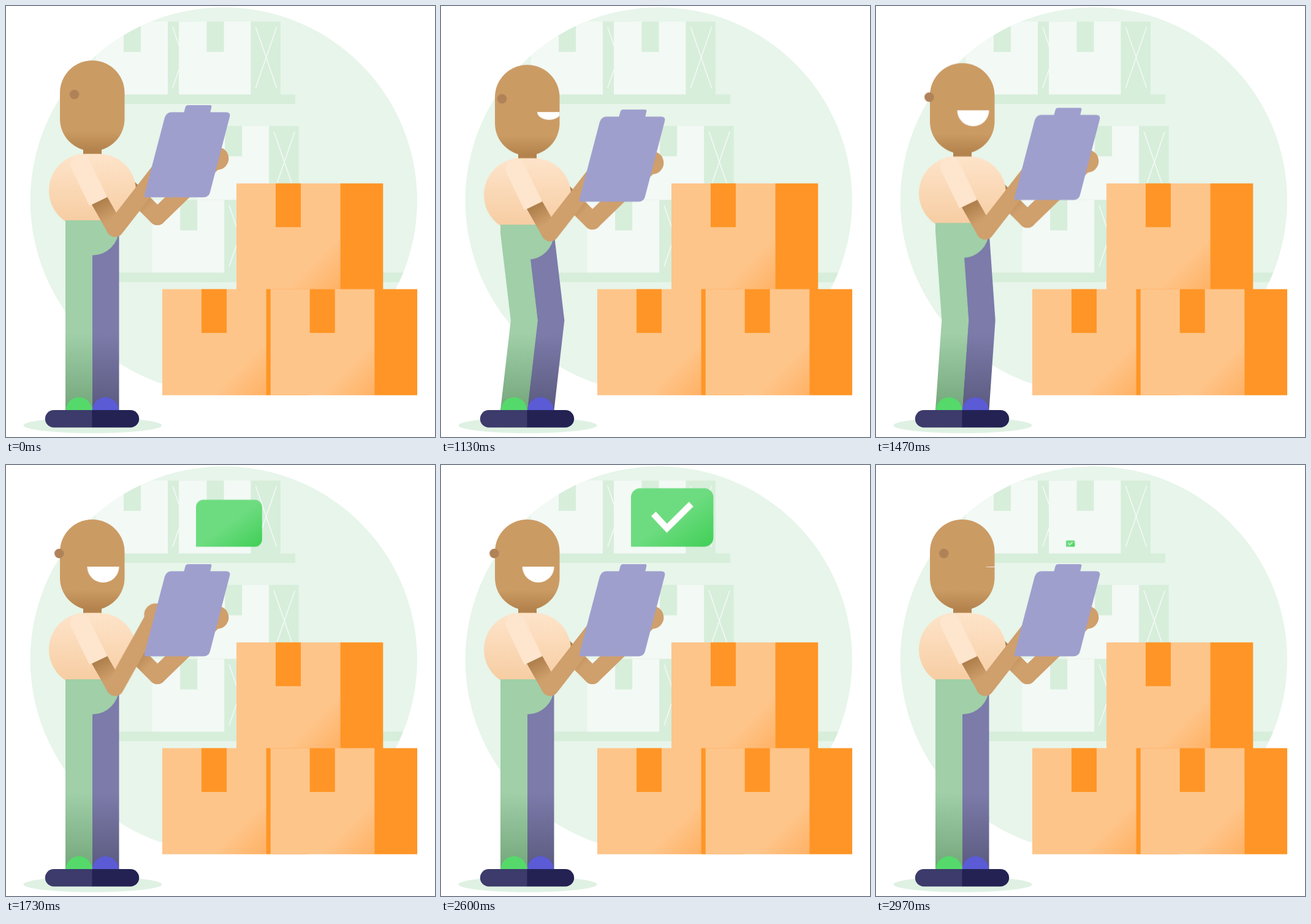
Animation, 700 px wide and 704 px high, one loop 3.01 s. Source, as an HTML page:

```html
<!DOCTYPE html>
<html lang="en">
<head>
<meta charset="utf-8">
<title>Stock check</title>
<style>
  html, body { margin: 0; width: 100%; height: 100%; overflow: hidden; background: #fff; }
  svg { display: block; width: 100vw; height: 100vh; }

  .body, .leg, .ear, .mouth, .forearm, .bubble, .tick {
    animation: 3010ms linear infinite;
  }

  /* knees bend and straighten */
  .body { animation-name: dip; }
  .leg { animation-name: bend; }
  @keyframes dip {
    0%, 33.22% { transform: translateY(0); animation-timing-function: cubic-bezier(.3, .75, .5, 1); }
    42.08% { transform: translateY(8.5px); animation-timing-function: cubic-bezier(.5, 0, .7, .25); }
    50.94%, 100% { transform: translateY(0); }
  }
  @keyframes bend {
    0%, 33.22% {
      d: path("M97 364L97 512L97 660L141 660L141 512L141 364Z");
      animation-timing-function: cubic-bezier(.3, .75, .5, 1);
    }
    42.08% {
      d: path("M97 372.5L117 514L97 660L141 660L161 514L141 372.5Z");
      animation-timing-function: cubic-bezier(.5, 0, .7, .25);
    }
    50.94%, 100% { d: path("M97 364L97 512L97 660L141 660L141 512L141 364Z"); }
  }

  /* head turns to the viewer and back */
  .ear { animation-name: ear; }
  .mouth { animation-name: smile; }
  @keyframes ear {
    0%, 33.22% { transform: translateX(0); animation-timing-function: cubic-bezier(.24, 0, .25, 1); }
    47.62%, 85.27% { transform: translateX(-24.7px); animation-timing-function: cubic-bezier(.75, 0, .76, 1); }
    99.67%, 100% { transform: translateX(0); }
  }
  @keyframes smile {
    0%, 33.22% {
      transform: translate(193.5px, 166px) scale(.5, 0);
      animation-timing-function: cubic-bezier(.24, 0, .25, 1);
    }
    47.62%, 85.27% {
      transform: translate(158.5px, 166px) scale(1, 1);
      animation-timing-function: cubic-bezier(.75, 0, .76, 1);
    }
    99.67%, 100% { transform: translate(193.5px, 166px) scale(.5, 0); }
  }

  /* hand lifts while the bubble pops up */
  .forearm { animation-name: lift; transform-origin: 178px 363px; }
  @keyframes lift {
    0%, 50.94% { transform: rotate(0deg); animation-timing-function: cubic-bezier(.3, .75, .5, 1); }
    59.8% { transform: rotate(-9deg); animation-timing-function: cubic-bezier(.5, 0, .7, .25); }
    68.66%, 100% { transform: rotate(0deg); }
  }
  .bubble { animation-name: pop; transform-origin: 310px 133.5px; }
  @keyframes pop {
    0%, 50.94% { transform: scale(0); animation-timing-function: cubic-bezier(.3, .46, .5, 1.31); }
    65.34%, 85.27% { transform: scale(1); animation-timing-function: cubic-bezier(.5, -.31, .7, .54); }
    99.67%, 100% { transform: scale(0); }
  }
  .tick { animation-name: draw; stroke-dasharray: 1 2; }
  @keyframes draw {
    0%, 57.6% { stroke-dashoffset: 1.01; animation-timing-function: cubic-bezier(.3, 0, .4, 1); }
    68.66%, 100% { stroke-dashoffset: 0; }
  }
</style>
</head>
<body>
<svg viewBox="0 0 700 704" preserveAspectRatio="none">
  <defs>
    <clipPath id="disc"><circle cx="355.3" cy="317.8" r="315.6"/></clipPath>
    <clipPath id="face"><rect x="88" y="89" width="105.5" height="148" rx="52.7"/></clipPath>
    <linearGradient id="card" x2="1" y2="1">
      <stop offset=".74" stop-color="#fec58a"/><stop offset="1" stop-color="#ffb164"/>
    </linearGradient>
    <linearGradient id="skin" x2="0" y2="1">
      <stop offset=".78" stop-color="#cb9b64"/><stop offset="1" stop-color="#b3824c"/>
    </linearGradient>
    <linearGradient id="shirt" x2="0" y2="1">
      <stop offset="0" stop-color="#fee4ca"/><stop offset="1" stop-color="#f6cb9f"/>
    </linearGradient>
    <linearGradient id="near" gradientUnits="userSpaceOnUse" x1="153" y1="319" x2="170" y2="349">
      <stop offset="0" stop-color="#ae7f4b"/><stop offset="1" stop-color="#cf9f6c"/>
    </linearGradient>
    <linearGradient id="far" gradientUnits="userSpaceOnUse" x1="208" y1="305" x2="233" y2="330">
      <stop offset="0" stop-color="#ae7f4b"/><stop offset="1" stop-color="#cf9f6c"/>
    </linearGradient>
    <linearGradient id="green" gradientUnits="userSpaceOnUse" x1="0" y1="535" x2="0" y2="660">
      <stop offset="0" stop-color="#a0cfa8"/><stop offset="1" stop-color="#74a67b"/>
    </linearGradient>
    <linearGradient id="violet" gradientUnits="userSpaceOnUse" x1="0" y1="535" x2="0" y2="660">
      <stop offset="0" stop-color="#7c7baa"/><stop offset="1" stop-color="#5b5a7f"/>
    </linearGradient>
    <linearGradient id="mint" x2="1" y2="1">
      <stop offset=".5" stop-color="#6ddc80"/><stop offset="1" stop-color="#40cf56"/>
    </linearGradient>

    <g id="stock">
      <rect width="117.5" height="120" fill="#f3f9f5"/>
      <path d="M117.5 0h48.5v120h-48.5zM45.5 0h28v49.5h-28z" fill="#d7eedb"/>
      <path d="M125.5 9l34 99m0-99l-34 99" stroke="#f3f9f5" stroke-width="1.6"/>
    </g>
    <g id="parcel">
      <rect width="169.8" height="173.3" fill="url(#card)"/>
      <path d="M169.5 0h69.8v173.3h-69.8zM64 0h41v71.5h-41z" fill="#ff9526"/>
    </g>
  </defs>

  <g clip-path="url(#disc)">
    <rect width="700" height="704" fill="#e7f5ea"/>
    <use href="#stock" x="146.5" y="25.5"/>
    <use href="#stock" x="282" y="25.5"/>
    <use href="#stock" x="311.7" y="196"/>
    <use href="#stock" x="238.7" y="317"/>
    <path d="M142 144.5h330v15.5h-330zM150 435.5h520v15.5h-520z" fill="#d7eedb"/>
  </g>

  <ellipse cx="141.5" cy="685" rx="113" ry="12.7" fill="#dff1e3"/>

  <g transform="translate(43.5)">
    <path class="leg" d="M97 364L97 512L97 660L141 660L141 512L141 364Z" fill="url(#violet)"/>
  </g>
  <path class="leg" d="M97 364L97 512L97 660L141 660L141 512L141 364Z" fill="url(#green)"/>

  <g class="body">
    <g fill="none" stroke-width="28" stroke-linecap="round">
      <path d="M247 344L345 249" stroke="#cf9f6c"/>
      <path d="M200 297L247 344" stroke="url(#far)"/>
    </g>
    <circle cx="344.8" cy="249" r="18.6" fill="#cf9f6c"/>

    <rect x="126" y="215" width="30" height="30" fill="#b4834d"/>
    <rect x="88" y="89" width="105.5" height="148" rx="52.7" fill="url(#skin)"/>
    <g clip-path="url(#face)">
      <path class="mouth" d="M-26 0A26 26 0 0 0 26 0Z" fill="#fff"/>
    </g>
    <circle class="ear" cx="111.5" cy="144.5" r="7.8" fill="#b08258"/>

    <rect x="70" y="241.5" width="142" height="120" rx="60" fill="url(#shirt)"/>
    <path d="M97 350H184.3V364A43.3 43.3 0 0 1 141 407.3V366H97Z" fill="#a0cfa8"/>

    <path d="M152 317L178 363" stroke="url(#near)" stroke-width="28"/>
    <g class="forearm">
      <path d="M178 363L261 256" stroke="#cf9f6c" stroke-width="28.5" stroke-linecap="round"/>
      <circle cx="261" cy="256" r="18.5" fill="#cf9f6c"/>
    </g>
    <circle cx="121" cy="258" r="16.2" fill="#fee5cd"/>
    <path d="M121 258L150.7 319.2" stroke="#fee5cd" stroke-width="32.4"/>

    <path d="M290 175L292.5 166Q293.5 162 297 162H333Q336 162 335.3 165L333 175Z
             M270 173.5H359Q367 173.5 365 181L333 304Q331 312.5 322 312.5H229Q225 312.5 226 308L259 182Q262 173.5 270 173.5Z" fill="#9f9fce"/>
  </g>

  <path d="M97.5 661a21.5 22 0 0 1 43 0z" fill="#55d96b"/>
  <path d="M140.8 661a21.5 22 0 0 1 43 0z" fill="#5b5bd6"/>
  <path d="M141 660H78a14.2 14.2 0 0 0 0 28.4H141z" fill="#3c3b6b"/>
  <path d="M140.5 660H203a14.2 14.2 0 0 1 0 28.4H140.5z" fill="#232253"/>

  <use href="#parcel" x="376" y="289.8"/>
  <use href="#parcel" x="255" y="462.5"/>
  <use href="#parcel" x="431.7" y="462.5"/>

  <g class="bubble">
    <path d="M310 133.5V56a14.3 14.3 0 0 1 14.3-14.3H425A14.3 14.3 0 0 1 439.2 56V119.2A14.3 14.3 0 0 1 425 133.5Z" fill="url(#mint)"/>
    <path class="tick" d="M345.3 82L366.3 104.5L404.3 66.7" pathLength="1" fill="none" stroke="#fff" stroke-width="10"/>
  </g>
</svg>
</body>
</html>
```
